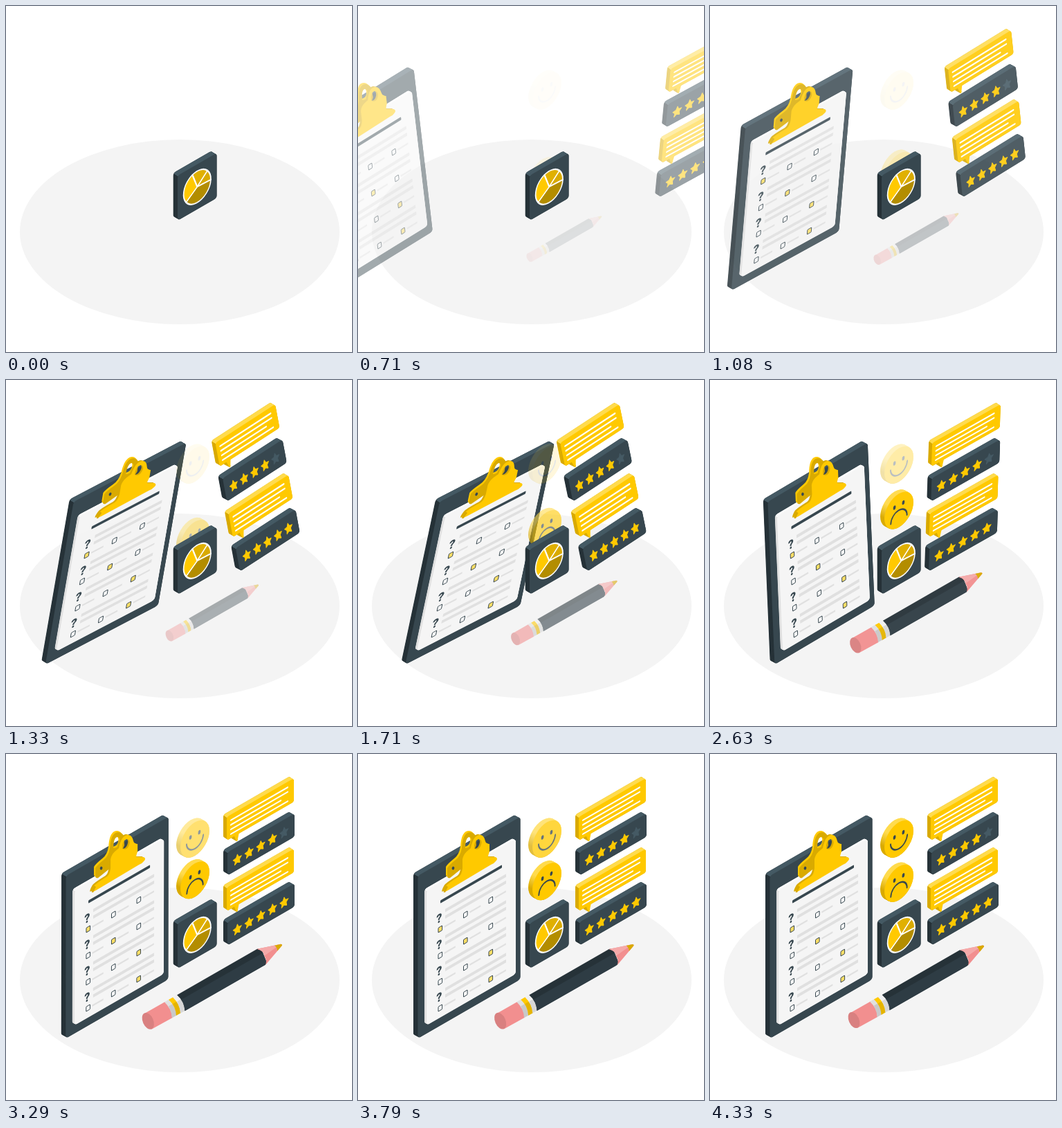
Recreate the animation shown at these times as an HTML page with a canvas. Size 500 by 500 pixels, loop 4.43 s.

```html
<!DOCTYPE html>
<html lang="en">
<head>
<meta charset="utf-8">
<title>Survey and feedback</title>
<style>
html, body { margin: 0; width: 100%; height: 100%; overflow: hidden; background: #fff; }
canvas { display: block; width: 500px; height: 500px; }
</style>
</head>
<body>
<canvas id="stage"></canvas>
<script>
const LOOP = 4430, STEP = 1000 / 24, LAST = 104, LEAD = 25;
const K = 0.577, TILT = 0.866;
const DARK = '#37474f', DEEP = '#263238', SLATE = '#455a64';
const GOLD = '#ffc900', LIGHT = '#ffdb4d', SHADE = '#d9aa00';

const ratio = window.devicePixelRatio || 1;
const stage = document.getElementById('stage');
const layer = document.createElement('canvas');
stage.width = stage.height = layer.width = layer.height = Math.round(500 * ratio);
const out = stage.getContext('2d');
const c = layer.getContext('2d');

const clamp = v => Math.min(1, Math.max(0, v));
const mix = (a, b, p) => a + (b - a) * p;

// cubic-bezier(.36, -.01, .5, 1.38)
function ease(x) {
  if (x <= 0) return 0;
  if (x >= 1) return 1;
  const at = (a, b, s) => 3 * (1 - s) * (1 - s) * s * a + 3 * (1 - s) * s * s * b + s * s * s;
  let lo = 0, hi = 1;
  for (let i = 0; i < 30; i++) {
    const m = (lo + hi) / 2;
    if (at(0.36, 0.5, m) < x) lo = m; else hi = m;
  }
  return at(-0.01, 1.38, lo);
}

function fill(path, color, rule) {
  c.fillStyle = color;
  c.fill(new Path2D(path), rule || 'nonzero');
}

// Runs draw in the upright plane that recedes to the upper right
function plane(x, y, draw, sx = 1) {
  c.save();
  c.transform(sx, -K * sx, 0, 1, x, y);
  draw();
  c.restore();
}

function bar(x, y, w, h, color, r = 0) {
  plane(x, y, () => {
    c.beginPath();
    c.roundRect(0, 0, w, h, r);
    c.fillStyle = color;
    c.fill();
  });
}

// Rounded panel with thickness d towards the left
function slab(x, y, w, h, d, e, r, face, side, top) {
  const extrude = color => {
    for (let i = 0; i <= 12; i++) bar(x - d * (1 - i / 12), y - e * (1 - i / 12), w, h, color, r);
  };
  extrude(side);
  c.save();
  c.beginPath();
  c.moveTo(x - d - 2, y - e - 1);
  c.lineTo(x + 1, y + 1);
  c.lineTo(x + w, y - K * w + 1);
  c.lineTo(x + w + 2, y - K * w - 30);
  c.lineTo(x - d - 2, y - 40);
  c.clip();
  extrude(top);
  c.restore();
  bar(x, y, w, h, face, r);
}

function checkbox(x, y, on) {
  plane(x, y, () => {
    c.beginPath();
    c.roundRect(-2.8, -3.4, 5.6, 6.8, 1);
    c.fillStyle = on ? '#ffdf66' : '#fafafa';
    c.fill();
    c.strokeStyle = DARK;
    c.lineWidth = 1;
    c.stroke();
  });
}

function clip() {
  const back = 'M127 163Q129 159 139 151Q146 146 148 134Q149 116 156 112Q163 109 168 116' +
    'L169 130L160 150L146 165L131 177Q127 178 127 174Z' +
    'M153 134Q153 120 158 118Q163 118 162 127Q160 134 153 134Z';
  fill(back, GOLD, 'evenodd');
  c.save();
  c.translate(2, 2);
  fill(back, SHADE, 'evenodd');
  c.restore();
  c.beginPath();
  c.ellipse(137.5, 165, 1.8, 2.4, 0.3, 0, 7);
  c.fillStyle = DARK;
  c.fill();

  const front = 'M124 200Q123 198 127 191Q128 188 146 177Q150 174 151 165L151 152Q152 146 157 141' +
    'L163 136Q166 119 175 117Q182 116 184 126Q185 130 190 130L190 141Q188 146 188 149' +
    'L199 149Q203 151 199 155Q197 158 192 160L130 197Z' +
    'M168 137Q167 126 174 123Q180 123 178 131Q175 140 168 137Z';
  c.save();
  c.translate(-2.5, -1);
  fill(front, SHADE, 'evenodd');
  c.restore();
  fill(front, GOLD, 'evenodd');
  fill('M124 200Q123 198 127 190L130 192L126 200Z', SHADE);
}

function clipboard() {
  slab(86.5, 176, 148, 235, 6.5, 3.5, 4, DARK, DEEP, SLATE);
  slab(99, 197, 129, 195, 3, 1.5, 4, '#f5f5f5', '#e0e0e0', '#fafafa');
  bar(119, 211.5, 89, 4.3, DARK, 1);
  const ticked = [0, 1, 2, 2];
  for (let g = 0; g < 4; g++) {
    const y = g * 38;
    bar(126, 224 + y, 88, 4.6, '#e0e0e0');
    bar(126, 233.5 + y, 88, 4.6, '#e0e0e0');
    plane(117.3, 237.2 + y, () => {
      c.font = '800 17px Inter, "Liberation Sans", sans-serif';
      c.textAlign = 'center';
      c.fillStyle = DARK;
      c.fillText('?', 0, 6.3);
    }, TILT);
    for (let i = 0; i < 3; i++) {
      const x = 118.8 + i * 36.5, by = 253 + y - i * 21;
      checkbox(x, by, ticked[g] === i);
      bar(x + 6, by - 4.4, 16, 2.4, '#e0e0e0');
    }
  }
  clip();
}

function bubble(y) {
  c.save();
  c.translate(0, y);
  fill('M325 117L326 122L333 126L335 124L331 114Z', SHADE);
  slab(319, 91, 97, 34, 5, 3.3, 3.5, GOLD, SHADE, LIGHT);
  fill('M329 117L337 113L334.5 125Q334 127 332.6 125Z', GOLD);
  [84, 84, 74, 84].forEach((w, i) => bar(324, 95 + i * 6.7, w, 2.3, '#fff', 1));
  c.restore();
}

function star(x, y, color) {
  plane(x, y, () => {
    c.beginPath();
    for (let i = 0; i < 10; i++) {
      const r = i % 2 ? 3.6 : 7.3, a = i * Math.PI / 5 - Math.PI / 2;
      c.lineTo(r * Math.cos(a), r * Math.sin(a));
    }
    c.closePath();
    c.fillStyle = c.strokeStyle = color;
    c.lineWidth = 1.2;
    c.lineJoin = 'round';
    c.fill();
    c.stroke();
  }, TILT);
}

function rating(y, score) {
  slab(320, 142 + y, 97, 33.5, 6, 3.5, 4, DARK, DEEP, SLATE);
  for (let i = 0; i < 5; i++) star(334.3 + i * 16.9, 152.5 + y - i * 9.75, i < score ? GOLD : SLATE);
}

function reviews() {
  rating(101, 5);
  bubble(102);
  rating(0, 4);
  bubble(0);
}

function disc(x, y, r, color) {
  plane(x, y, () => {
    c.beginPath();
    c.arc(0, 0, r, 0, 7);
    c.fillStyle = color;
    c.fill();
  }, TILT);
}

function face(y, happy) {
  const x = 273, r = 24.2;
  const edge = c.createLinearGradient(0, y - 16, 0, y + 4);
  edge.addColorStop(0, LIGHT);
  edge.addColorStop(1, SHADE);
  for (let i = 0; i <= 12; i++) disc(x - 6 * (1 - i / 12), y - 3.3 * (1 - i / 12), r, edgeless(edge, y));
  disc(x, y, r, GOLD);
  plane(x, y, () => {
    c.fillStyle = c.strokeStyle = DARK;
    for (const ex of [-7.4, 7.4]) {
      c.beginPath();
      c.ellipse(ex, happy ? -6 : -7.8, 2.2, 3, 0, 0, 7);
      c.fill();
    }
    c.beginPath();
    if (happy) c.arc(0, 0, 14, 0.05, Math.PI - 0.05);
    else c.arc(0, 13, 13.5, Math.PI, 0);
    c.lineWidth = 2.2;
    c.lineCap = 'round';
    c.stroke();
  }, TILT);
}

// The gradient is read in plane space, so anchor it to the disc centre
function edgeless(_, y) {
  const g = c.createLinearGradient(-6, -12, -12, 4);
  g.addColorStop(0, LIGHT);
  g.addColorStop(1, SHADE);
  return g;
}

function chart() {
  slab(248, 245, 56.5, 65, 6.3, 3.7, 4, DARK, DEEP, SLATE);
  const x = 276.3, y = 261.3, r = 22.7;
  // Sector edges as points on the rim, clockwise
  const rim = [[-7.5, -18.5], [14, -22], [20, -10.5], [-14, 19.5]].map(([dx, dy]) =>
    Math.atan2(dy + K * dx, dx / TILT));
  const tints = ['#e0b000', '#d9aa00', '#b38d00', GOLD];
  plane(x, y, () => {
    c.strokeStyle = '#fff';
    c.lineWidth = 2;
    c.lineJoin = 'round';
    rim.forEach((a, i) => {
      c.beginPath();
      c.moveTo(0, 0);
      c.arc(0, 0, r, a, rim[(i + 1) % 4]);
      c.closePath();
      c.fillStyle = tints[i];
      c.fill();
      c.stroke();
    });
  }, TILT);
}

function pencil() {
  fill('M203 374L232 357.5Q242 366 242 380L213 396Z', '#f28f8f');
  c.beginPath();
  c.ellipse(208, 384.5, 7.4, 12.2, -0.42, 0, 7);
  c.fillStyle = '#d98080';
  c.fill();
  const bands = ['#e0e0e0', GOLD, '#f0f0f0'];
  bands.forEach((color, i) => {
    const dx = i * 5.9, dy = -i * 3.3;
    c.save();
    c.translate(dx, dy);
    fill('M231 357.8L237.2 354.3Q247 363 248 376.5L241.6 380.2Q241 367 231 357.8Z', color);
    fill('M236.7 363.7L242.7 360.3Q247 367 248 376.5L241.6 380.2Q241 371 236.7 363.7Z', 'rgba(0,0,0,.1)');
    c.restore();
  });
  fill('M248.6 348L361 283.3Q365 281.5 368 286L374 301Q374 305 371 306.5L259.6 370.2Q259 357 248.6 348Z', DEEP);
  fill('M254.6 354.5L369 289L374 301Q374 305 371 306.5L259.6 370.2Q259 361 254.6 354.5Z', '#2e3c44');
  fill('M361 283.3L394 276.6Q397 277 395.5 279L373 305.5Q375 298 371 293Q371 286 361 283.3Z', '#f28f8f');
  fill('M361 283.3L394 276.6L371 293Q371 286 361 283.3Z', '#f5a9a9');
  fill('M385.5 278.4L394 276.6Q397 277 395.5 279L389.5 286Q389 281 385.5 278.4Z', SHADE);
}

// Draws a group on its own layer, then lays it down with one opacity
function show(alpha, m, draw) {
  alpha = clamp(alpha);
  if (alpha <= 0) return;
  c.setTransform(1, 0, 0, 1, 0, 0);
  c.clearRect(0, 0, layer.width, layer.height);
  c.scale(ratio, ratio);
  c.transform(...m);
  draw();
  out.save();
  out.setTransform(1, 0, 0, 1, 0, 0);
  out.globalAlpha = alpha;
  out.drawImage(layer, 0, 0);
  out.restore();
}

// Fast slide-in with a wobbling skew; dir 1 enters from the left, -1 from the right
function dash(u, dir, oy, draw) {
  const k0 = 0.364, k1 = -0.1763, k2 = 0.0349;
  let tx = 0, k, alpha = 1;
  if (u < 0.6) {
    const p = ease(u / 0.6);
    tx = -250 * dir * (1 - p);
    k = mix(k0, k1, p);
    alpha = p;
  } else if (u < 0.8) k = mix(k1, k2, ease((u - 0.6) / 0.2));
  else k = mix(k2, 0, ease((u - 0.8) / 0.2));
  k *= dir;
  show(alpha, [1, 0, k, 1, tx - k * oy, 0], draw);
}

const still = [1, 0, 0, 1, 0, 0];

function render(time) {
  const n = Math.min(LAST, Math.floor((time + 5) / STEP));
  const t = n < 6 ? 0 : n * STEP + LEAD;
  out.setTransform(ratio, 0, 0, ratio, 0, 0);
  out.fillStyle = '#fff';
  out.fillRect(0, 0, 500, 500);
  out.beginPath();
  out.ellipse(251, 326.5, 231, 133.5, 0, 0, 7);
  out.fillStyle = '#f4f4f4';
  out.fill();

  if (t) {
    dash(t / 3360, 1, 249, clipboard);
    dash(t / 3215, -1, 154, reviews);
    show(Math.pow(clamp(t / 4330), 2.2), still, () => face(122.8, true));
    const rise = ease(t / 4050);
    show(rise, [1, 0, 0, 1, 0, 70 * (1 - rise)], () => face(186.8, false));
  }
  show(1, still, chart);
  if (t) {
    const p = ease(t / 4200), s = 0.5 + 0.5 * p;
    show(p, [s, 0, 0, s, 298 * (1 - s), 337 * (1 - s)], pencil);
  }
}

const start = performance.now();
function tick() {
  render((performance.now() - start) % LOOP);
  requestAnimationFrame(tick);
}
tick();
</script>
</body>
</html>
```
